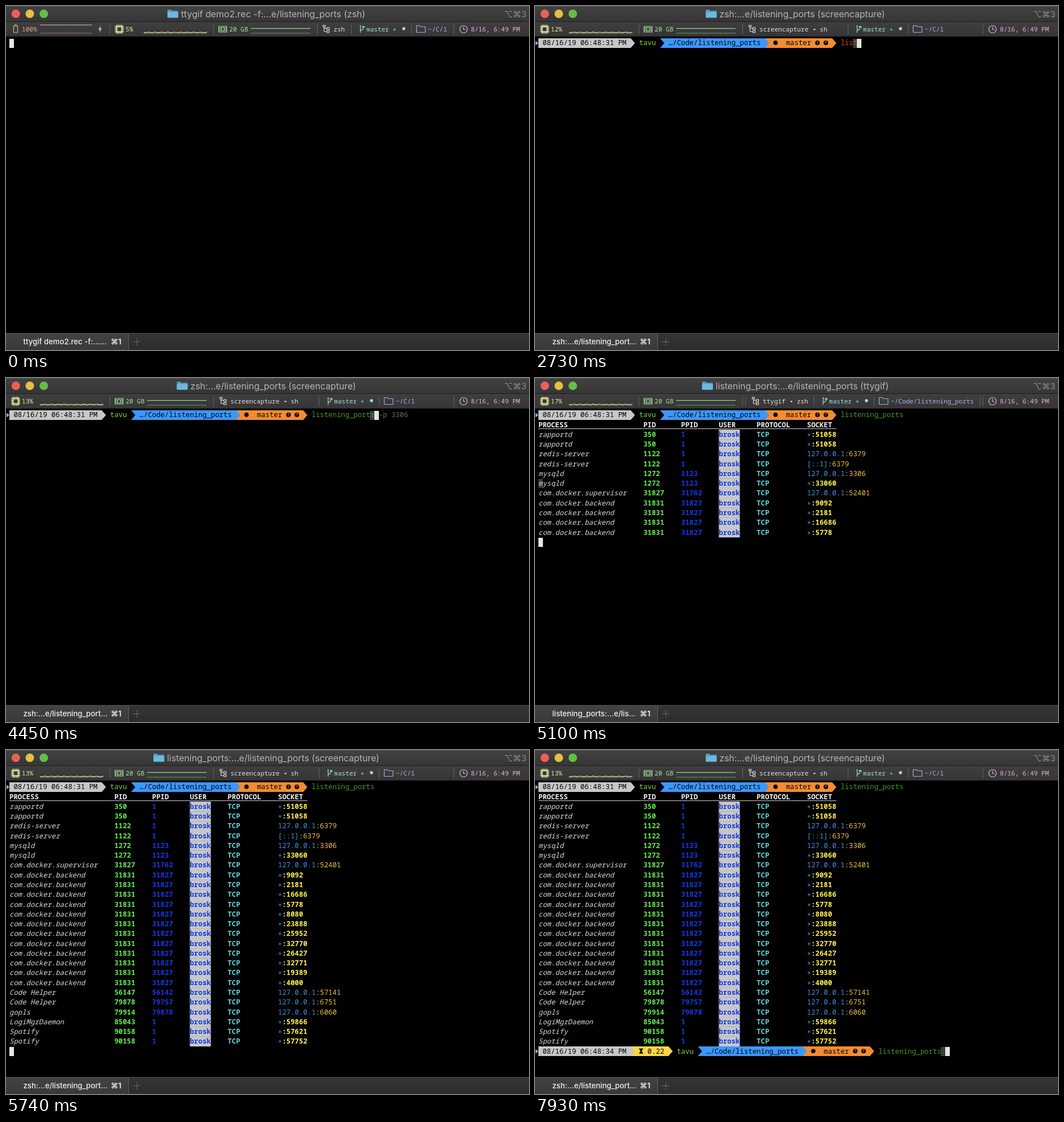
Write an HTML page with a canvas that moves like this. It is 923 by 607 pixels and loops after 8000 ms.

```html
<!DOCTYPE html>
<html lang="en">
<head>
<meta charset="utf-8">
<title>Terminal session</title>
<style>
  html, body { margin: 0; width: 100%; height: 100%; overflow: hidden; background: #000; }
  canvas { display: block; }
</style>
</head>
<body>
<canvas id="stage" width="923" height="607"></canvas>
<script>
const ctx = document.getElementById('stage').getContext('2d');
const LOOP = 8000, COL = 7.406, ROW = 17.27, LEFT = 6, TOP = 56.5;
const MONO = '"Noto Sans Mono", "DejaVu Sans Mono", monospace';
const SANS = 'Inter, "DejaVu Sans", sans-serif';
const HOST = 'tavu', USER = 'brosk', COMMAND = 'listening_ports';
const GRAY = '#c7c7c7', BLUE = '#3d97fb', ORANGE = '#f28c33', YELLOW = '#ffd54a';

const backendPorts = '9092 2181 16686 5778 8080 23888 25952 32770 26427 32771 19389 4000';
const processes = [
  'rapportd|350|1|∗:51058', 'rapportd|350|1|∗:51058',
  'redis-server|1122|1|127.0.0.1:6379', 'redis-server|1122|1|[::1]:6379',
  'mysqld|1272|1123|127.0.0.1:3306', 'mysqld|1272|1123|∗:33060',
  'com.docker.supervisor|31827|31762|127.0.0.1:52401',
  ...backendPorts.split(' ').map(port => `com.docker.backend|31831|31827|∗:${port}`),
  'Code Helper|56147|56142|127.0.0.1:57141', 'Code Helper|79878|79757|127.0.0.1:6751',
  'gopls|79914|79878|127.0.0.1:6060', 'LogiMgrDaemon|85043|1|∗:59866',
  'Spotify|90158|1|∗:57621', 'Spotify|90158|1|∗:57752',
].map(line => line.split('|'));

// Key times of each typed character
const firstKeys = [2415, 2520, 2625, 2730, 3330, 3420, 3570, 3630, 3690, 3860, 4050, 4120, 4190, 4350, 4450];
const secondKeys = [6330, 6410, 6490, 6570, 6650, 6730, 6810, 6890, 6970, 7170, 7380, 7450, 7520, 7690, 7790, 7930];

const layouts = {
  start: { shift: 183, seps: [183, 366, 549, 609, 715, 790], job: [578, 'zsh'], git: 636, dir: [745, '~/C/l'] },
  capture: { shift: 0, seps: [183, 366, 552, 658, 790], job: [396, 'screencapture ◂ sh'], git: 579, dir: [688, '~/C/l'] },
  tty: { shift: 0, seps: [183, 366, 371, 492, 598, 785, 790], job: [402, 'ttygif ◂ zsh'], git: 519, dir: [628, '~/Code/listening_ports'] },
};
const PORTS_DIR = '...e/listening_ports';
const titles = [
  [0, `ttygif demo2.rec -f:${PORTS_DIR} (zsh)`], [100, `zsh:${PORTS_DIR} (ttygif)`],
  [510, `zsh:${PORTS_DIR} (screencapture)`], [4730, `listening_ports:${PORTS_DIR} (screencapture)`],
  [5000, `listening_ports:${PORTS_DIR} (ttygif)`], [5465, `listening_ports:${PORTS_DIR} (screencapture)`],
  [5930, `zsh:${PORTS_DIR} (screencapture)`],
];
const tabs = [
  [0, 'ttygif demo2.rec -f:......'], [100, 'zsh:...e/listening_port...'],
  [4730, 'listening_ports:...e/lis...'], [5465, 'zsh:...e/listening_port...'],
];
const bars = [[0, 'start'], [510, 'capture'], [5000, 'tty'], [5465, 'capture']];
const loads = [[0, '5%'], [510, '12%'], [3860, '13%'], [5000, '17%'], [5465, '13%'], [6250, '14%'], [7170, '13%']];
const clocks = [[0, 29], [1940, 30], [2310, 31]];

const valueAt = (list, t) => list.findLast(([start]) => t >= start)[1];
const pressed = (keys, t) => keys.filter(key => t >= key).length;
const colX = col => LEFT + col * COL;
const rowY = row => TOP + row * ROW;

function rect(x, y, w, h, color) {
  ctx.fillStyle = color;
  ctx.fillRect(x, y, w, h);
}
function shade(x, y, w, h, from, to) {
  const fill = ctx.createLinearGradient(0, y, 0, y + h);
  fill.addColorStop(0, from);
  fill.addColorStop(1, to);
  rect(x, y, w, h, fill);
}
function disc(x, y, r, color) {
  ctx.fillStyle = color;
  ctx.beginPath();
  ctx.arc(x, y, r, 0, 7);
  ctx.fill();
}
function path(d, color, x = 0, y = 0, filled = false, width = 1.2) {
  ctx.save();
  ctx.translate(x, y);
  ctx.lineWidth = width;
  ctx.fillStyle = ctx.strokeStyle = color;
  ctx[filled ? 'fill' : 'stroke'](new Path2D(d));
  ctx.restore();
}
function text(str, x, y, color, font) {
  ctx.font = font;
  ctx.fillStyle = color;
  ctx.fillText(str, x, y);
}
function cells(str, col, row, color, style = '') {
  [...str].forEach((ch, i) => text(ch, colX(col + i), rowY(row) + 12.8, color, `${style} 12.34px ${MONO}`));
}

function drawTitle(t) {
  shade(0, 0, 923, 27, '#424242', '#363636');
  rect(0, 0, 923, 1, '#555');
  rect(0, 27, 923, 1, '#1c1c1c');
  ['#ec5f55', '#e3c045', '#65be46'].forEach((color, i) => disc(17.3 + i * 24.7, 13.8, 7.5, color));
  const title = valueAt(titles, t);
  ctx.font = `15.8px ${SANS}`;
  const x = 459.5 - (ctx.measureText(title).width + 24) / 2;
  path('M0 1.5Q0 0 1.5 0H6L8 2H17.5Q19 2 19 3.5V13Q19 14.5 17.5 14.5H1.5Q0 14.5 0 13Z', '#4f9fcb', x, 6.5, true);
  rect(x, 10.5, 19, 9.5, '#6fb7de');
  text(title, x + 24, 19.5, '#b5b5b5', ctx.font);
  text('⌥⌘3', 879, 19.5, '#8b8b8b', `15px ${SANS}`);
}

function drawStatus(t) {
  const { shift, seps, job, git, dir } = layouts[valueAt(bars, t)];
  const label = (str, x, color) => text(str, x, 44.8, color, `500 11.1px ${MONO}`);
  shade(0, 28, 923, 26, '#3e3e3e', '#363636');
  rect(0, 53, 923, 1, '#2a2a2a');
  seps.forEach(x => rect(x, 33, 1, 17, '#626262'));

  if (shift) {
    const salmon = '#dfa58c';
    path('M0 2.5H7V14H0ZM2 2V0H5V2', salmon, 13.5, 33);
    label('100%', 28, salmon);
    rect(60, 33, 92, 1, '#efb0b0');
    rect(60, 47.5, 92, 1, '#a87762');
    path('M5 0L0 8H3L1.5 14L7 5.5H4Z', salmon, 162.5, 34, true);
  }
  const lemon = '#e9e6a2', green = '#a4e39b';
  path('M3.5 3.5H12.5V12.5H3.5Z', lemon, 9 + shift, 33, false, 2);
  path('M3.5 0V3M6.5 0V3M9.5 0V3M12.5 0V3M3.5 13V16M6.5 13V16M9.5 13V16M12.5 13V16' +
       'M0 3.5H3M0 6.5H3M0 9.5H3M0 12.5H3M13 3.5H16M13 6.5H16M13 9.5H16M13 12.5H16', lemon, 9 + shift, 33, false, 1.6);
  label(valueAt(loads, t), 28 + shift, lemon);
  let spark = 'M0 46.5';
  for (let i = 1; i <= 56; i++) spark += `L${i * 2} ${46.7 + 0.5 * Math.sin(i * 1.1) + 0.3 * Math.sin(i * 2.3)}`;
  path(spark, lemon, 60 + shift);
  rect(60 + shift, 48, 112, 0.6, '#827f5c');

  path('M0 .5H15M0 10.5H15M.5 0V11M14.5 0V11M5 2.5H10V8.5H5ZM1 3H4M1 5.5H4M1 8H4M11 3H14M11 5.5H14M11 8H14', green, 192 + shift, 35.5);
  label('20 GB', 211 + shift, green);
  rect(249 + shift, 39, 105, 1.2, '#9bd592');
  rect(249 + shift, 47.5, 105, 1, '#6f9a69');

  path('M2 3V11H7M2 5.5H7M7 4H11V7.5H7ZM7 9.5H11V13H7ZM0 0H4V3H0Z', '#dcdcdc', job[0] - 18.5, 34);
  label(job[1], job[0], '#e0e0e0');
  const cyan = '#9fe3dc';
  path('M1.5 2V14M1.5 10Q7 9.5 7 3M4.5 5L7 2.5L9.5 5M0 2H3', cyan, git - 12, 33);
  label('master +', git, cyan);
  disc(git + 66, 40, 2.7, cyan);
  path('M0 1Q0 0 1 0H5L7 2H14.5Q15.5 2 15.5 3V11Q15.5 12 14.5 12H1Q0 12 0 11Z', '#9daeea', dir[0] - 20.5, 34.5);
  label(dir[1], dir[0], '#a4b4ec');
  path('M6.5 0A6.5 6.5 0 1 1 6.49 0M6.5 2.5V7H10', '#e0a9e2', 801, 34.5);
  label('8/16, 6:49 PM', 820.5, '#e5aee6');
}

// Powerline segment between two columns, with a pointed right end
function segment(from, to, row, color, notch = false) {
  const [a, b, y] = [colX(from), colX(to), Math.round(rowY(row))];
  const bite = notch ? `L${a + COL} ${y + 8.5}` : '';
  path(`M${a} ${y}H${b}L${b + COL} ${y + 8.5}L${b} ${y + 17}H${a}${bite}Z`, color, 0, 0, true);
}
function badge(mark, col, row) {
  const x = colX(col + 0.5), y = rowY(row) + 8.4;
  disc(x, y, 4, '#000');
  ctx.textAlign = 'center';
  text(mark, x, y + 2.6, ORANGE, `bold 7px ${SANS}`);
  ctx.textAlign = 'left';
}
function drawPrompt(row, seconds, elapsed) {
  const y = rowY(row), shift = elapsed ? 9 : 0;
  path('M0 0L5 4L0 8Z', '#79b5dc', 1, y + 5, true);
  if (elapsed) {
    segment(22, 31, row, YELLOW);
    path('M0 0H7V1.5H6Q6 3.5 4.3 4.5Q6 5.5 6 7.5H7V9H0V7.5H1Q1 5.5 2.7 4.5Q1 3.5 1 1.5H0Z', '#000', colX(24), y + 4, true);
    cells(elapsed, 26, row, '#000');
  }
  segment(0, 22, row, GRAY);
  cells(`08/16/19 06:48:${seconds} PM`, 1, row, '#000');
  cells(HOST, 24 + shift, row, '#7fdc35');
  segment(54 + shift, 70 + shift, row, ORANGE);
  segment(29 + shift, 54 + shift, row, BLUE, true);
  cells('…/Code/listening_ports', 31 + shift, row, '#000');
  disc(colX(56.5 + shift), y + 8.4, 3.8, '#000');
  cells('master', 59 + shift, row, '#000');
  badge('!', 66 + shift, row);
  badge('?', 68 + shift, row);
}

function block(col, row, color) {
  rect(Math.floor(colX(col)), Math.round(rowY(row) + 1), 8, 16, color);
}
const drawCursor = (col, row) => block(col, row, '#e6e6e6');
const drawGhost = (col, row) => block(col, row, '#3c3c3c');

function drawInput(col, row, count, hint, active) {
  if (active && count) drawGhost(col + count - 1, row);
  cells(hint.slice(count), col + count, row, '#686868');
  cells(COMMAND.slice(0, count), col, row, count < COMMAND.length ? '#e2412f' : '#45991f');
  if (active) {
    drawCursor(col + count, row);
    cells(hint[count] || '', col + count, row, '#555');
  }
}

function drawTable(t) {
  const step = Math.floor((t - 5098.6) / 91.6);
  const count = t < 5000 ? 0 : t < 5100 ? 5 : Math.min(processes.length, 11 + 2 * step);
  if (t >= 5100 && t < 5190) drawGhost(0, 7);
  [['PROCESS', 0], ['PID', 25], ['PPID', 34], ['USER', 43], ['PROTOCOL', 52], ['SOCKET', 64]]
    .forEach(([name, col]) => cells(name, col, 1, '#f4f4f4', 'bold'));
  rect(LEFT, Math.round(rowY(1) + 15), COL * 71, 1, '#d0d0d0');
  processes.slice(0, count).forEach(([name, pid, parent, socket], i) => {
    const row = i + 2, split = socket.lastIndexOf(':'), wild = socket[0] === '∗';
    cells(name, 0, row, '#dadada', 'italic');
    cells(pid, 25, row, '#62ec4d', 'bold');
    cells(parent, 34, row, '#1238e8', 'bold');
    rect(colX(43), rowY(row), COL * 5, ROW + 0.3, GRAY);
    cells(USER, 43, row, '#1238e8', 'bold');
    cells('TCP', 52, row, '#62d6dc', 'bold');
    cells(socket.slice(0, split), 64, row, '#3f93e6');
    cells(socket.slice(split), 64 + split, row, wild ? '#fff050' : '#eec33e', wild ? 'bold' : '');
  });
  if (t < 5930) drawCursor(0, count + 2);
}

function drawTerminal(t) {
  if (t < 180) return drawCursor(0, 0);
  drawPrompt(0, valueAt(clocks, t));
  drawInput(72, 0, pressed(firstKeys, t), t >= 3240 && t < 4630 ? COMMAND + ' -p 3306' : '', t < 4630);
  if (t >= 4630 && t < 4830) drawCursor(0, 1);
  if (t >= 4830) drawTable(t);
  if (t >= 5930) {
    const count = pressed(secondKeys, t);
    drawPrompt(27, t < 6250 ? 33 : 34, '0.22');
    drawInput(81, 27, count, count >= 4 ? COMMAND : '', true);
  }
}

function drawTabs(t) {
  shade(0, 577, 923, 30, '#353535', '#2c2c2c');
  shade(0, 577, 216, 30, '#434343', '#393939');
  rect(0, 577, 923, 1, '#505050');
  rect(216, 578, 1, 29, '#5c5c5c');
  text(valueAt(tabs, t), 30.5, 597, '#f2f2f2', `500 13.2px ${SANS}`);
  text('⌘1', 185, 597, '#f2f2f2', `600 13.2px ${SANS}`);
  path('M0 6.5H13M6.5 0V13', '#6c6c6c', 224.5, 586, false, 1);
}

function frame(now) {
  const t = now % LOOP;
  rect(0, 0, 923, 607, '#000');
  drawTerminal(t);
  drawTitle(t);
  drawStatus(t);
  drawTabs(t);
  requestAnimationFrame(frame);
}
requestAnimationFrame(frame);
</script>
</body>
</html>
```
